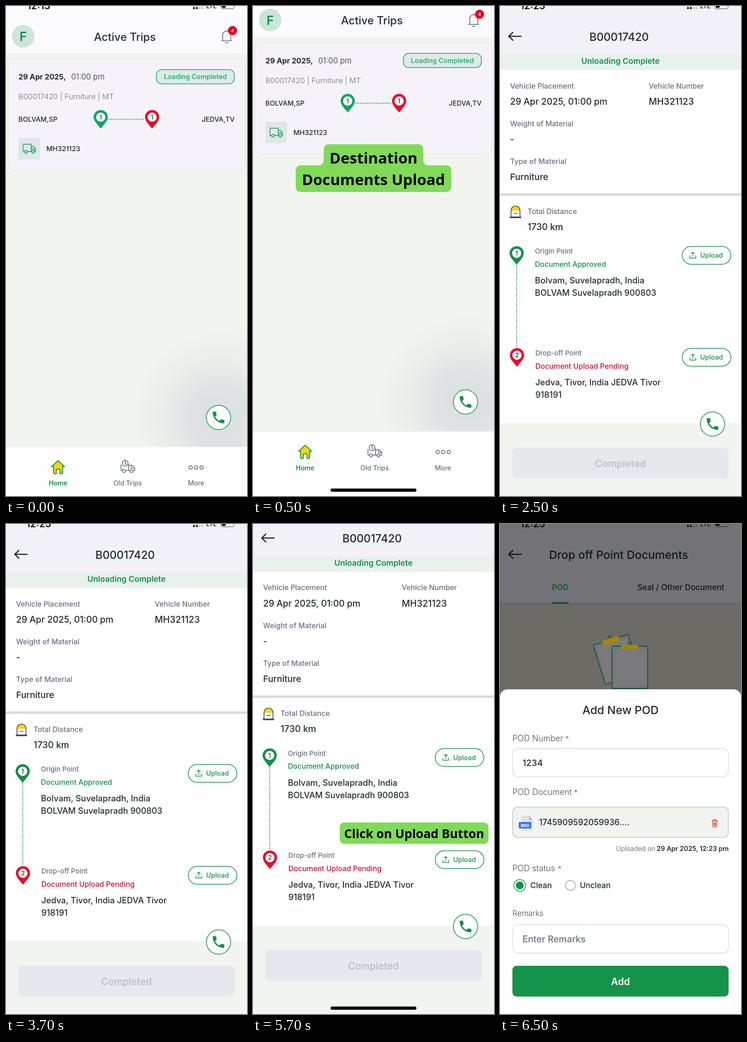
Animation of 525x1067 px, one loop 8 s. Source, as an HTML page:

```html
<!DOCTYPE html>
<html lang="en">
<head>
<meta charset="utf-8">
<title>Trip documents walkthrough</title>
<style>
  html, body { margin: 0; width: 100%; height: 100%; overflow: hidden; background: #fff; }
  svg { display: block; width: 100%; height: 100%; font-family: Inter, "Liberation Sans", sans-serif; }
  .caption { font-family: "Open Sans", "Noto Sans", sans-serif; }
  .line { fill: none; stroke-linecap: round; stroke-linejoin: round; }
</style>
</head>
<body>
<svg id="stage" viewBox="0 0 525 1067" preserveAspectRatio="none"></svg>
<script>
const INK = '#222b2f', GREY = '#667085', SOFT = '#4a5058', GREEN = '#15904a', RED = '#ec0928',
      PALE = '#f1f4ef', LIME = '#80da58', YELLOW = '#fbd50c';
const DIM = { ink: '#12171a', green: '#0b5a30', yellow: '#a5850a', head: '#737377', body: '#6c6b66' };

// Text is placed by the middle of its capitals.
const text = (str, x, mid, size, weight = 500, fill = INK, anchor = 'start') =>
  `<text x="${x}" y="${mid + size * .36}" font-size="${size}" font-weight="${weight}" fill="${fill}" text-anchor="${anchor}">${str}</text>`;
const centred = (str, x, mid, size, weight, fill) => text(str, x, mid, size, weight, fill, 'middle');
const box = (x, y, w, h, r, fill, stroke = 'none', sw = 1.4) =>
  `<rect x="${x}" y="${y}" width="${w}" height="${h}" rx="${r}" fill="${fill}" stroke="${stroke}" stroke-width="${sw}"/>`;
const dot = (x, y, r, fill, stroke = 'none', sw = 1.5) =>
  `<circle cx="${x}" cy="${y}" r="${r}" fill="${fill}" stroke="${stroke}" stroke-width="${sw}"/>`;
const line = (d, stroke, sw = 1.5, extra = '') =>
  `<path class="line" d="${d}" stroke="${stroke}" stroke-width="${sw}" ${extra}/>`;
const dotted = d => line(d, '#2b8a58', 1.5, 'stroke-dasharray="2 3"');
const at = (x, y, body, turn = 0) => `<g transform="translate(${x} ${y}) rotate(${turn})">${body}</g>`;

const statusBar = (time, x, ink = '#111', faint = '#c8c8cc', frame = '#777') =>
  text(time, x, -1, 20.8, 600, ink) +
  [409.5, 415.8, 422.2, 428.5].map((cx, i) =>
    dot(cx, 4.5, 2.3, i < 2 ? ink : faint) + dot(cx, -1.5, 2, i < 2 ? ink : faint)).join('') +
  text('LTE', 436, .3, 13.4, 500, ink) +
  box(467.5, -9, 29.5, 15, 4.5, 'none', frame, 1.3) + box(470, -7, 8.5, 11, 2, ink);

const homeBar = box(169, 1084.2, 187, 7, 3.5, '#000');

const pin = (x, y, fill, label) => at(x, y,
  `<path d="M0 25C-5 18-15.5 9-15.5 0A15.5 15.5 0 1 1 15.5 0C15.5 9 5 18 0 25Z" fill="${fill}"/>` +
  dot(0, 0, 10, '#fff') + centred(label, 0, 0, 13, 500));

const handset = 'M-7.6-1.7C-5.6 2.2-2.2 5.6 1.7 7.6L4.8 4.5Q5.5 3.8 6.3 4.2Q8.600 5 11.300 5Q12.700 5 12.700 6.400V11.300Q12.700 12.700 11.300 12.700C-2 12.700-12.700 2-12.700-11.300Q-12.700-12.700-11.300-12.700H-6.400Q-5-12.700-5-11.300Q-5-8.600-4.200-6.300Q-3.800-5.500-4.500-4.800Z'
  .replace(/(\.\d)00/g, '$1');
const phone = y => at(463, y, dot(0, 0, 26.5, '#fff', GREEN) +
  `<path d="${handset}" fill="${GREEN}"/>`);

const backArrow = ink => line('M46 66H19M28 57.5L19 66l9 8.5', ink, 2.5);

const truck = line('M37 317V302.5Q37 301 38.5 301H55V317H46.5M40 317H37M55 306H60L64 311V317H62.5M56 317H55M55 311.5H64', GREEN, 1.4) +
  dot(43.3, 317.5, 3, 'none', GREEN, 1.4) + dot(59.3, 317.5, 3, 'none', GREEN, 1.4);

const bell = line('M469.5 75.5H491.5M472 75V64C472 51.5 489.5 51.5 489.5 64V75M480.7 54V52M477.5 79Q480.7 81 484 79', GREY, 1.7);

const homeIcon =
  `<path d="M113.5 990L99.5 1003H103.5V1016Q103.5 1018.5 106 1018.5H109.5V1010.5Q109.5 1008.5 111.5 1008.5H115.5Q117.5 1008.5 117.5 1010.5V1018.5H121Q123.5 1018.5 123.5 1016V1003H127.5Z" fill="${YELLOW}" stroke="${GREEN}" stroke-width="2" stroke-linejoin="round"/>`;

const oldTripsIcon =
  line('M250.5 999V1011.5H253M261 1011.5H269M267 998V1011.5M267 1000H275L280.5 1006V1012H277.5M273 1001V1006H280M259.5 991V996L262 998', GREY, 1.7) +
  dot(259.5, 995.5, 6.3, 'none', GREY, 1.7) +
  dot(257, 1012.5, 3.3, 'none', GREY, 1.7) + dot(273.3, 1012.5, 3.3, 'none', GREY, 1.7);

const tripsScreen = () =>
  box(0, 0, 525, 1110, 0, PALE) +
  box(270, 700, 255, 260, 0, 'url(#glow)') +
  box(0, 103, 525, 2, 0, '#eef0ee') + box(0, 0, 525, 103.5, 0, '#fbfafe') +
  statusBar('12:13', 46) +
  dot(37.5, 66, 24.5, '#cde5d8') + centred('F', 37.5, 66.5, 27, 600, GREEN) +
  centred('Active Trips', 259, 67, 23.7) +
  bell + dot(493.5, 53.5, 10, '#f0041f') + centred('4', 493.5, 53.5, 9.5, 600, '#fff') +
  box(5, 115.5, 515, 240.5, 14, '#f6f2fa', '#d9dfd5', 1.2) +
  box(6.2, 116.7, 512.6, 238.1, 13, 'none', '#fdfcfe', 1.2) +
  text('29 Apr 2025,', 27, 154, 16.2, 700) + text('01:00 pm', 142, 154, 17, 300) +
  box(327.5, 138.5, 170, 31, 12, '#dcebe6', '#17a765', 1.6) +
  centred('Loading Completed', 412.5, 154, 14.7, 500, '#19a567') +
  text('B00017420 | Furniture | MT', 27, 197, 16.4, 300, '#6f7280') +
  text('BOLVAM,SP', 27, 247, 14.8) + text('JEDVA,TV', 498, 247, 14.8, 500, INK, 'end') +
  dotted('M223 246.5H303') +
  pin(206.3, 242, '#0ca862', 1) + pin(318.3, 242, RED, 1) +
  box(27, 287, 47, 47, 4, '#dde8e8') + truck +
  text('MH321123', 88, 311, 14.8) +
  phone(896) +
  box(0, 960.5, 525, 150, 0, '#fdfdfe') +
  homeIcon + centred('Home', 113.5, 1039, 14.2, 600, GREEN) +
  oldTripsIcon + centred('Old Trips', 265, 1039, 14.4, 500, GREY) +
  [402.3, 414.2, 426.2].map(x => dot(x, 1005, 3.7, 'none', GREY, 1.8)).join('') +
  centred('More', 414, 1039, 14.4, 500, GREY) + homeBar;

const caption = (str, x, mid, size = 15.8) => text(str, x, mid, size, 500, GREY);

const upload = y =>
  box(397, y - 19.5, 106, 39, 19.5, '#fff', GREEN, 1.5) +
  at(420, y, line('M-6.5 1V6H6.5V1M0 2.5V-7M-3.8-3.5L0-7L3.8-3.5', GREEN, 1.4)) +
  text('Upload', 436, y, 14.5, 500, GREEN);

const milestone =
  `<path d="M24 459V447C24 432 43.5 432 43.5 447V459Z" fill="#fff"/>
   <path d="M24 446C24 432 43.5 432 43.5 446Z" fill="${YELLOW}"/>` +
  line('M24 459V446C24 432 43.5 432 43.5 446V459M30.5 451.5H37', '#3c4b54', 1.7) +
  box(21.5, 458.5, 24.5, 3.5, .5, '#3c4b54');

const detailScreen = () =>
  box(0, 0, 525, 1110, 0, PALE) + box(0, 0, 525, 908, 0, '#fff') +
  box(0, 0, 525, 104, 0, '#f2f1f8') + box(0, 104, 525, 35.5, 0, '#e8f2ec') +
  statusBar('12:23', 44) + backArrow(INK) +
  centred('B00017420', 259.5, 67, 23.8) +
  centred('Unloading Complete', 262.5, 120, 17.35, 600, GREEN) +
  caption('Vehicle Placement', 22, 174) + caption('Vehicle Number', 324, 174) +
  text('29 Apr 2025, 01:00 pm', 22, 208, 19.4) + text('MH321123', 324, 208, 19.8) +
  caption('Weight of Material', 22, 256) + text('-', 22, 290, 19.4) +
  caption('Type of Material', 22, 338) + text('Furniture', 22, 372, 19.3) +
  box(0, 408, 525, 5.5, 0, '#d5dce1') +
  milestone + caption('Total Distance', 60, 447.5) + text('1730 km', 60, 481, 19.6) +
  dotted('M36.5 564V744') +
  pin(36.3, 538.5, GREEN, 1) + pin(37, 760.5, RED, 2) +
  caption('Origin Point', 76, 534, 14.8) +
  text('Document Approved', 76, 562, 15.75, 500, GREEN) +
  text('Bolvam, Suvelapradh, India', 76, 597.5, 18.4) +
  text('BOLVAM Suvelapradh 900803', 76, 624.5, 18.2) + upload(543) +
  caption('Drop-off Point', 77, 756, 14.8) +
  text('Document Upload Pending', 77, 784, 15.9, 500, '#d00f31') +
  text('Jedva, Tivor, India JEDVA Tivor', 77, 819.5, 18.3) +
  text('918191', 77, 846.5, 18.3) + upload(765) +
  phone(910.2) +
  box(27, 962, 471, 67, 9, '#e5e8ec') + centred('Completed', 262.5, 996, 21, 600, '#bcc1ce') +
  homeBar;

const clipboard = (w, h) =>
  box(-w / 2, 0, w, h, 3, '#747478', DIM.green, 1.8) +
  box(-w / 2 + 5, 8, w - 10, h - 14, 2, '#7a7a7e') +
  dot(0, -6, 3.5, 'none', DIM.green) + box(-18.5, -3, 37, 11, 1, DIM.yellow);

const label = (str, mid, starX) =>
  text(str, 27, mid, 18, 300, SOFT) + centred('*', starX, mid + 1, 17, 300, '#c8404a');

const trash = line('M461.5 646.5H474M465 646V643.5H470.5V646M463 647L463.7 659.5H471.8L472.5 647M466 650V656.5M467.8 650V656.5M469.6 650V656.5', '#cf3a36', 1.3);

const sheetScreen = () =>
  box(0, 0, 525, 1067, 0, DIM.body) + box(0, 0, 525, 173, 0, DIM.head) +
  statusBar('12:23', 44, '#0c0c0c', '#5e5e61', '#3a3a3a') + backArrow(DIM.ink) +
  text('Drop off Point Documents', 107, 67, 24.6, 500, DIM.ink) +
  centred('POD', 131.3, 138, 17, 600, DIM.green) +
  text('Seal / Other Document', 299, 138, 17.5, 500, DIM.ink) +
  box(0, 172.5, 525, 1.3, 0, '#5b5f52') +
  `<path d="M112.5 174V173Q112.5 170 116 170H146.5Q150 170 150 173V174Z" fill="${DIM.green}"/>` +
  at(241, 252, clipboard(79, 90), -17) + at(282.8, 266, clipboard(78, 92)) +
  box(0, 360, 525, 740, 16, '#fff') +
  centred('Add New POD', 262.5, 405, 24.6) +
  label('POD Number', 467, 146) +
  box(27.5, 488.5, 470, 62, 12, '#fff', '#d8dbe0') + text('1234', 49, 520, 19.2) +
  label('POD Document', 584, 165) +
  box(27.5, 616.5, 470, 66, 11, PALE, '#bfc4c4') +
  `<path d="M49 635H63L71.5 644V665Q71.5 667 69.5 667H49Q47 667 47 665V637Q47 635 49 635Z" fill="#dde2e4"/>
   <path d="M63 635L71.5 644H63Z" fill="#b5bdc1"/>` +
  box(41, 649, 27, 14, 1, '#3f6fe0') + centred('IMG', 54.5, 656.2, 9.5, 700, '#fff') +
  text('1745909592059936....', 85, 649, 18.1) + trash +
  text('29 Apr 2025, 12:23 pm', 498, 706.5, 14.3, 600, INK, 'end') +
  text('Uploaded on', 253, 706.5, 14.3, 300, SOFT) +
  label('POD status', 750, 130) +
  dot(43, 787, 12.7, '#fff', GREEN) + dot(43, 787, 8.5, GREEN) + text('Clean', 66, 787, 17.1) +
  dot(153.5, 787, 10.8, '#fff', '#8d949c', 1.3) + text('Unclean', 174, 787, 17) +
  text('Remarks', 27, 848, 16.8, 300, SOFT) +
  box(27.5, 872.5, 470, 62, 12, '#fff', '#d8dbe0') + text('Enter Remarks', 49, 904, 19.8, 500, GREY) +
  box(27, 962, 471, 67, 9, '#16934a') + centred('Add', 262.5, 996, 20.9, 600, '#fff');

const titleCaption =
  `<path fill="${LIME}" d="M166 301H359Q371 301 371 313V335Q371 347 383 347H420Q432 347 432 359V393Q432 405 420 405H105Q93 405 93 393V359Q93 347 105 347H142Q154 347 154 335V313Q154 301 166 301Z"/>` +
  centred('Destination', 262.5, 331, 32.8, 700, '#000') +
  centred('Documents Upload', 262.5, 378, 32.8, 700, '#000');

const uploadCaption = box(189, 650, 324, 46.5, 10, LIME) +
  centred('Click on Upload Button', 351, 674, 26.6, 700, '#000');

const group = (id, body, cls = '') => `<g id="${id}" class="${cls}" visibility="hidden">${body}</g>`;
const stage = document.getElementById('stage');
stage.innerHTML = `<defs><radialGradient id="glow" gradientUnits="userSpaceOnUse" cx="463" cy="896" r="190">
    <stop offset="0" stop-color="#d9dee1"/><stop offset=".35" stop-color="#dfe3e4"/>
    <stop offset=".65" stop-color="#eaedea"/><stop offset="1" stop-color="${PALE}"/>
  </radialGradient></defs>` +
  group('trips', tripsScreen()) + group('detail', detailScreen()) + group('sheet', sheetScreen()) +
  group('titleCaption', titleCaption, 'caption') + group('uploadCaption', uploadCaption, 'caption');

const steps = [
  { until: 500, screen: 'trips' },
  { until: 2500, screen: 'trips', note: 'titleCaption' },
  { until: 4500, screen: 'detail' },
  { until: 6500, screen: 'detail', note: 'uploadCaption' },
  { until: 8000, screen: 'sheet' },
];
const parts = [...stage.querySelectorAll('g[id]')];
const start = performance.now();

function draw() {
  const time = (performance.now() - start) % 8000;
  const { screen, note } = steps.find(step => time < step.until);
  for (const part of parts) {
    const shown = part.id === screen || part.id === note;
    part.setAttribute('visibility', shown ? 'visible' : 'hidden');
    // Captioned screens sit higher, so the home bar comes into view.
    if (part.id === screen) part.setAttribute('transform', note ? 'matrix(1 0 0 1.002 0 -35.6)' : '');
  }
  requestAnimationFrame(draw);
}
draw();
</script>
</body>
</html>
```
